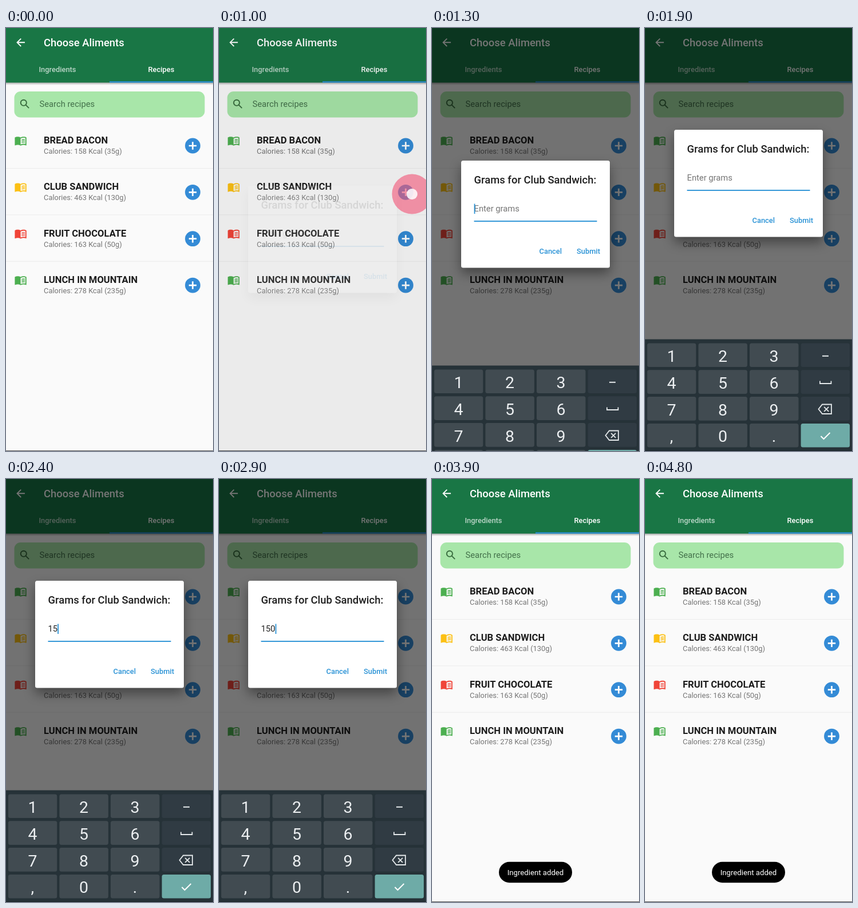
An HTML page that plays this animation: 362x740 px, repeating every 5000 ms.

```html
<!DOCTYPE html>
<html lang="en">
<head>
<meta charset="utf-8">
<title>Choose Aliments</title>
<style>
  html, body { margin: 0; width: 100%; height: 100%; overflow: hidden; background: #fafafa; }
  svg { display: block; width: 100%; height: 100%; font-family: Roboto, sans-serif; }
  .heading { font-size: 18.43px; font-weight: 500; }
  .label { font-size: 12.9px; font-weight: 500; }
  .input { font-size: 14.75px; }
  .dish { font-size: 16.6px; font-weight: 700; fill: #1c1c1c; }
  .small { font-size: 12.9px; fill: #757575; }
  .digit { font-size: 28.5px; fill: #eceff1; }
  .mid { text-anchor: middle; }
  .line { fill: none; stroke: #e4e8ea; stroke-width: 1.8; }
  #dialogCard { filter: drop-shadow(0 10px 10px rgba(0, 0, 0, .4)); }
</style>
</head>
<body>
<svg id="stage" viewBox="0 0 362 740">
  <defs>
    <linearGradient id="shade" x2="0" y2="1">
      <stop stop-color="#000" stop-opacity=".34"/>
      <stop offset="1" stop-color="#000" stop-opacity="0"/>
    </linearGradient>
    <g id="book">
      <path d="M21 5c-1.1-.35-2.3-.5-3.5-.5-1.95 0-4.05.4-5.5 1.5-1.45-1.1-3.55-1.5-5.5-1.5S2.45 4.9 1 6v14.65c0 .25.25.5.5.5C3.1 20.45 5.05 20 6.5 20c1.95 0 4.05.4 5.5 1.5 1.35-.85 3.8-1.5 5.5-1.5 1.65 0 3.35.3 4.75 1.05.4.15.75-.1.75-.45V6c-.6-.45-1.25-.75-2-1zm0 13.5c-1.1-.35-2.3-.5-3.5-.5-1.7 0-4.15.65-5.5 1.5V8c1.35-.85 3.8-1.5 5.5-1.5 1.2 0 2.4.15 3.5.5z"/>
      <path d="M14 10.5q2.6-1.2 6-.6M14 13.2q2.6-1.2 6-.6M14 15.9q2.6-1.2 6-.6" fill="none" stroke="currentColor" stroke-width="1.5"/>
    </g>
    <g id="add">
      <circle r="13.4" fill="#348bd6"/>
      <path d="M-6.7 0h13.4M0-6.7v13.4" stroke="#fff" stroke-width="2.7"/>
    </g>
  </defs>

  <rect width="362" height="740" fill="#fafafa"/>
  <rect y="95" width="362" height="5" fill="url(#shade)"/>
  <rect width="362" height="95.5" fill="#197645"/>
  <rect x="181" y="93.3" width="181" height="2.2" fill="#2e91dc"/>
  <path transform="translate(14.5 14.2) scale(.922)" fill="#fff" d="M20 11H7.83l5.59-5.59L12 4l-8 8 8 8 1.41-1.41L7.83 13H20z"/>
  <g fill="#fff">
    <text class="heading" x="66" y="32">Choose Aliments</text>
    <text class="label mid" x="90" y="77" opacity=".7">Ingredients</text>
    <text class="label mid" x="271.5" y="77">Recipes</text>
  </g>
  <rect x="14.5" y="111" width="333" height="45.5" rx="11" fill="#a8e6a9"/>
  <g fill="#43704a">
    <g fill="none" stroke="#376b3d" stroke-width="1.9">
      <circle cx="30.8" cy="130.8" r="5.1"/><path d="M34.6 134.6l5.5 5.5"/>
    </g>
    <text class="input" x="58.5" y="138.2">Search recipes</text>
  </g>
  <g id="rows"></g>
  <rect y="739" width="362" height="1" fill="#555"/>

  <rect id="scrim" width="362" height="740"/>

  <g id="dialog">
    <rect id="dialogCard" x="51" y="178" width="260" height="187.5" rx="3.5" fill="#fff"/>
    <text class="heading" x="73.5" y="217.5" fill="#1f1f1f">Grams for Club Sandwich:</text>
    <text id="hint" class="input" x="73.5" y="267" fill="#757575">Enter grams</text>
    <text id="value" class="input" x="73.5" y="267" fill="#222"></text>
    <rect id="cursor" y="253.5" width="1.8" height="17.5" fill="#2b93d6"/>
    <rect x="73.5" y="283" width="215" height="1.9" fill="#2b93d6"/>
    <rect id="ripple" x="250" y="320" width="50" height="32" rx="3" fill="#2b93d6" opacity=".2"/>
    <g class="label" fill="#2b93d6">
      <text x="187.5" y="340.5">Cancel</text>
      <text x="253" y="340.5">Submit</text>
    </g>
  </g>

  <g id="keyboard">
    <rect y="544.5" width="362" height="196" fill="#263238"/>
    <g id="keys"></g>
    <rect x="310" y="572.8" width="11" height="2" fill="#e4e8ea"/>
    <path class="line" d="M306 617.5v4.5h19.5v-4.5"/>
    <path class="line" d="M310 658.5h16v16.5h-16l-6.5-8.2zM313.2 662.8l8 8m0-8l-8 8"/>
    <path class="line" d="M307.5 714l5 5 11-11" style="stroke:#fff;stroke-width:2"/>
    <rect y="739" width="362" height="1" fill="#182126"/>
  </g>

  <g id="toast">
    <rect x="-64" y="-18.2" width="128" height="36.4" rx="18.2"/>
    <text class="mid" y="4.7" font-size="13.2" fill="#fff">Ingredient added</text>
  </g>

  <g id="touch">
    <circle r="35" fill="#f2587a" opacity=".62"/>
    <circle r="9.6" fill="#fff" opacity=".85"/>
  </g>
</svg>
<script>
const LOOP = 5000, STEP = 100;
const el = id => document.getElementById(id);

const recipes = [
  ['BREAD BACON', 158, 35, '#4caf50'],
  ['CLUB SANDWICH', 463, 130, '#fcc014'],
  ['FRUIT CHOCOLATE', 163, 50, '#f04438'],
  ['LUNCH IN MOUNTAIN', 278, 235, '#4caf50'],
];
el('rows').innerHTML = recipes.map(([name, kcal, grams, color], i) => `
  <g transform="translate(0 ${i * 81.35})">
    <use href="#book" transform="translate(14.5 186) scale(.922)" style="fill:${color};color:${color}"/>
    <text class="dish" x="66" y="202">${name}</text>
    <text class="small" x="66" y="220">Calories: ${kcal} Kcal (${grams}g)</text>
    <use href="#add" x="326.5" y="206"/>
    ${i < 3 ? '<rect y="245" width="362" height="1" fill="#ececec"/>' : ''}
  </g>`).join('');

el('keys').innerHTML = ['123 ', '456 ', '789 ', ',0. '].map((row, r) =>
  [...row].map((char, c) => {
    const x = 3.8 + c * 89.6, y = 551.5 + r * 46.8;
    const fill = c < 3 ? '#414b51' : r < 3 ? '#303b43' : '#6eaba7';
    return `<rect x="${x}" y="${y}" width="85.5" height="41.6" rx="3.5" fill="${fill}"/>
      <text class="digit mid" x="${x + 42.6}" y="${y + 32.5}">${char}</text>`;
  }).join('')).join('');

// Piecewise-linear value through [time, value] points.
function track(t, points) {
  const next = points.findIndex(p => p[0] > t);
  if (next === 0) return points[0][1];
  if (next < 0) return points.at(-1)[1];
  const [t0, a] = points[next - 1], [t1, b] = points[next];
  return a + (b - a) * (t - t0) / (t1 - t0);
}

const scrim = [[900, 0], [1000, .06], [1100, .3], [1200, .54], [3500, .54], [3600, .39], [3700, .1], [3800, 0]];
const dialogAlpha = [[900, 0], [1000, .1], [1100, .75], [1200, 1], [3500, 1], [3600, .65], [3700, .12], [3800, 0]];
const dialogDrop = [[1100, 98], [1200, 90], [1300, 54], [1400, 14], [1500, 0]];
const keyboardDrop = [[1100, 196], [1200, 140], [1300, 46], [1400, 10], [1500, 0],
  [3500, 0], [3600, 10], [3700, 110], [3800, 196]];
const toastScale = [[3600, .75], [3700, 1]];

const show = (id, on) => el(id).setAttribute('visibility', on ? 'visible' : 'hidden');
const move = (id, x, y, scale = 1) =>
  el(id).setAttribute('transform', `translate(${x} ${y}) scale(${scale})`);

function draw(t) {
  el('scrim').setAttribute('opacity', track(t, scrim));
  el('dialog').setAttribute('opacity', track(t, dialogAlpha));
  move('dialog', 0, track(t, dialogDrop));
  move('keyboard', 0, track(t, keyboardDrop));

  const typed = t < 3500 ? [2100, 2400, 2700].filter(at => t >= at).length : 0;
  el('value').textContent = '150'.slice(0, typed);
  show('hint', !typed);
  el('cursor').setAttribute('x', 73.6 + typed * 8.3);
  show('cursor', t >= 1200 && t < 1700 || t >= 2100 && t < 3300);

  const submitting = t >= 3500 && t < 3700;
  show('ripple', submitting);
  show('touch', submitting || t >= 1000 && t < 1100);
  if (submitting) move('touch', 291, 340);
  else move('touch', 337.5, 290.5);

  const scale = track(t, toastScale);
  show('toast', t >= 3600);
  move('toast', 181, 688 + (1 - scale) * 48, scale);
}

function frame(now) {
  draw(Math.floor(now % LOOP / STEP) * STEP);
  requestAnimationFrame(frame);
}
draw(0);
requestAnimationFrame(frame);
</script>
</body>
</html>
```
